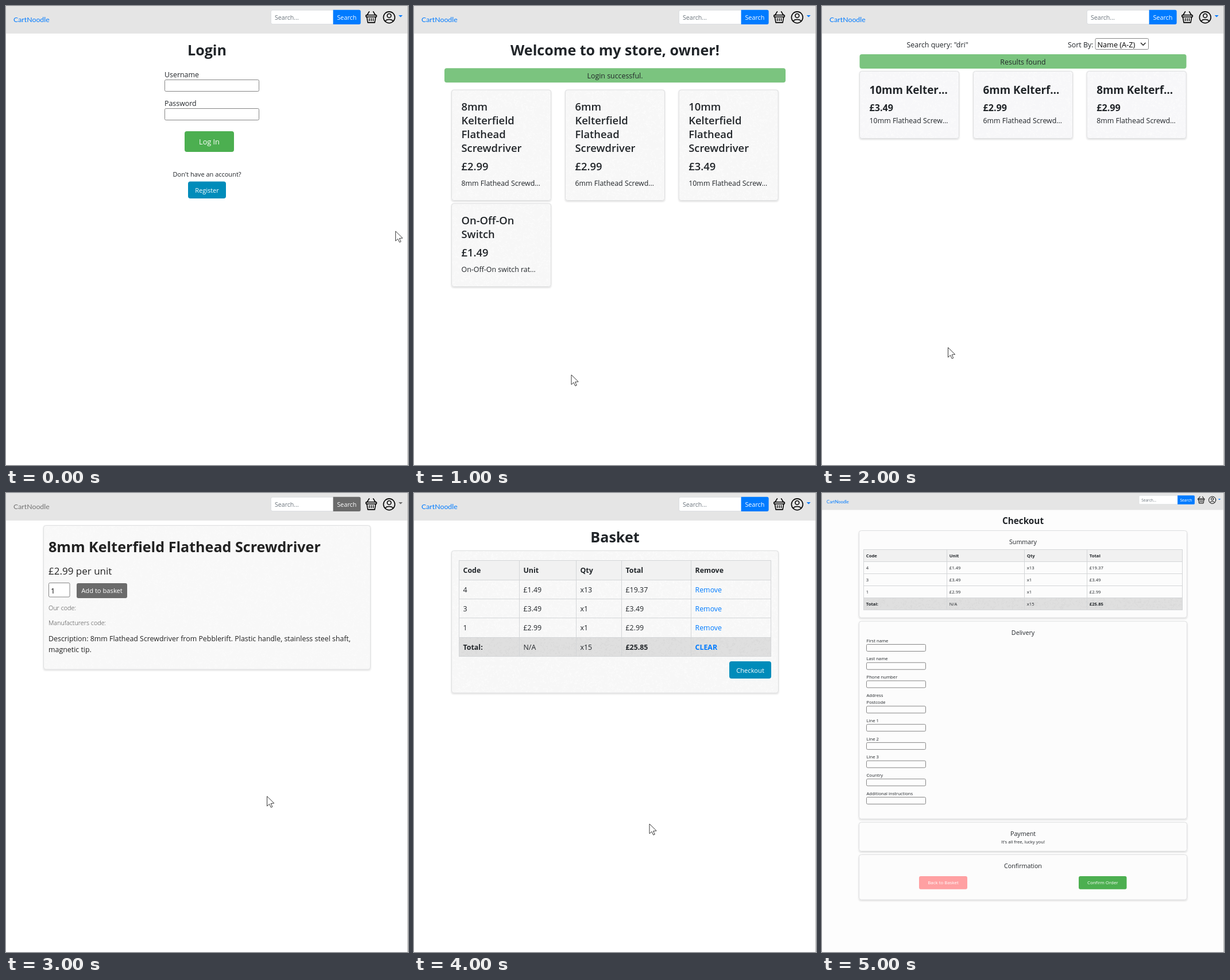
Write an HTML page with a canvas that moves like this. It is 700x799 px and loops after 6000 ms.

```html
<!DOCTYPE html>
<html lang="en">
<head>
<meta charset="utf-8">
<title>Web shop walkthrough</title>
<style>
html, body { margin: 0; width: 100%; height: 100%; overflow: hidden; background: #fff; }
canvas { display: block; width: 700px; height: 799px; }
</style>
</head>
<body>
<canvas id="stage"></canvas>
<script>
const W = 700, H = 799, SCENE_MS = 1000;
const canvas = document.getElementById('stage');
const ctx = canvas.getContext('2d');
const dpr = window.devicePixelRatio || 1;
canvas.width = W * dpr;
canvas.height = H * dpr;

const INK = '#212529', BLUE = '#007bff', GREEN = '#4caf50', TEAL = '#008cba';
const GREY = '#6b6b6b', OK = '#7bc47f', EDGE = '#dedfe0';
const SANS = '"Open Sans", "Noto Sans", sans-serif';
const BODY = 12.4;
const BRAND = 'CartNoodle', USER = 'owner', MAKER = 'Kelterfield', SUPPLIER = 'Pebblerift';

function text(str, x, y, size = BODY, { weight = 400, color = INK, align = 'left', family = SANS } = {}) {
  ctx.font = `${weight} ${size}px ${family}`;
  ctx.fillStyle = color;
  ctx.textAlign = align;
  ctx.fillText(str, x, y);
}

function centered(str, x, y, size, opts = {}) {
  text(str, x, y, size, { ...opts, align: 'center' });
}

function box(x, y, w, h, r, fill, stroke) {
  ctx.beginPath();
  ctx.roundRect(x, y, w, h, r);
  if (fill) {
    ctx.fillStyle = fill;
    ctx.fill();
  }
  if (stroke) {
    ctx.strokeStyle = stroke;
    ctx.lineWidth = 1;
    ctx.stroke();
  }
}

function line(points, color, width = 1) {
  ctx.beginPath();
  points.forEach(([x, y]) => ctx.lineTo(x, y));
  ctx.strokeStyle = color;
  ctx.lineWidth = width;
  ctx.stroke();
}

function random(seed) {
  return () => (seed = (seed * 16807) % 2147483647) / 2147483647;
}

// Fine crackle made of short, randomly turned strokes.
function crackle(x, y, w, h, color) {
  const rnd = random(7 + Math.round(x * 31 + y * 17));
  ctx.save();
  ctx.beginPath();
  ctx.rect(x, y, w, h);
  ctx.clip();
  ctx.beginPath();
  for (let n = w * h / 16; n > 0; n--) {
    const px = x + rnd() * w, py = y + rnd() * h, a = rnd() * 6.283;
    ctx.moveTo(px, py);
    ctx.lineTo(px + 3.5 * Math.cos(a), py + 3.5 * Math.sin(a));
  }
  ctx.strokeStyle = color;
  ctx.lineWidth = 0.7;
  ctx.stroke();
  ctx.restore();
}

function card(x, y, w, h, fill = '#f7f7f7', grain = '#fdfdfd') {
  ctx.save();
  ctx.shadowColor = 'rgba(0,0,0,.14)';
  ctx.shadowBlur = 3 * dpr;
  ctx.shadowOffsetY = 1.5 * dpr;
  box(x, y, w, h, 4, fill);
  ctx.restore();
  if (grain) crackle(x + 1, y + 1, w - 2, h - 2, grain);
  box(x + 0.5, y + 0.5, w - 1, h - 1, 4, null, EDGE);
}

function input(x, y, w, h, fill = '#fff') {
  box(x + 0.5, y + 0.5, w - 1, h - 1, 2, fill, '#858585');
}

function button(label, x, y, w, h, fill, size, baseline) {
  box(x, y, w, h, h > 28 ? 4 : 3, fill);
  centered(label, x + w / 2, baseline, size, { color: '#fff' });
}

function basketIcon() {
  ctx.lineCap = ctx.lineJoin = 'round';
  line([[632.4, 9.8], [628.6, 16]], '#000', 1.6);
  line([[639.6, 9.8], [643.4, 16]], '#000', 1.6);
  ctx.beginPath();
  ctx.roundRect(626.7, 15.8, 18.6, 3.2, 1);
  ctx.stroke();
  line([[628.3, 19], [630, 28.9], [642, 28.9], [643.7, 19]], '#000', 1.6);
  for (const x of [632.6, 636, 639.4]) line([[x, 21.8], [x, 25.8]], '#000', 1.4);
}

function userIcon() {
  ctx.strokeStyle = '#000';
  ctx.lineWidth = 1.6;
  ctx.beginPath();
  ctx.arc(667.2, 19.8, 9.9, 0, 7);
  ctx.stroke();
  ctx.beginPath();
  ctx.arc(667.2, 16.9, 3.4, 0, 7);
  ctx.stroke();
  ctx.beginPath();
  ctx.moveTo(660.4, 26.5);
  ctx.bezierCurveTo(662.4, 22.5, 672, 22.5, 674, 26.5);
  ctx.stroke();
}

function header(accent, scale = 1) {
  ctx.fillStyle = '#e5e5e5';
  ctx.fillRect(0, 0, W, scale === 1 ? 48 : 29.5);

  ctx.save();
  ctx.scale(scale, scale);
  text(BRAND, 13, 28.3, 12.3, { color: accent === GREY ? '#727272' : accent, family: 'Lato, sans-serif' });
  ctx.restore();

  ctx.save();
  ctx.translate(W * (1 - scale), 0);
  ctx.scale(scale, scale);
  box(461.3, 7.2, 109, 24.4, [3, 0, 0, 3], '#fff', '#dadde0');
  text('Search...', 468, 24, 10.6, { color: '#6c757d' });
  box(569.6, 6.7, 48, 25.3, [0, 3, 3, 0], accent);
  centered('Search', 593.4, 23.8, 10.8, { color: '#fff' });
  basketIcon();
  userIcon();
  ctx.beginPath();
  ctx.moveTo(683.6, 16);
  ctx.lineTo(690.6, 16);
  ctx.lineTo(687.1, 19.6);
  ctx.fillStyle = accent;
  ctx.fill();
  ctx.restore();
}

function title(str, y = 86.3, size = 25.1) {
  centered(str, 350, y, size, { weight: 700 });
}

function banner(str, x, y, w) {
  box(x, y, w, 25, 4, OK);
  centered(str, 350, y + 18, BODY);
}

function pointer(x, y) {
  const shape = [[0, 0], [0, 17], [4, 13.4], [6.8, 19.3], [9.3, 18.2], [6.6, 12.5], [12.2, 12]];
  ctx.beginPath();
  shape.forEach(([dx, dy]) => ctx.lineTo(x + dx, y + dy));
  ctx.closePath();
  ctx.fillStyle = '#fff';
  ctx.fill();
  ctx.strokeStyle = '#222';
  ctx.lineWidth = 0.9;
  ctx.lineJoin = 'miter';
  ctx.stroke();
}

// Last row is the shaded total; cols and rows are grid line positions.
function table(cols, rows, data, size, pad, drop, links) {
  const left = cols[0], right = cols.at(-1), top = rows[0], bottom = rows.at(-1);
  const last = data.length - 1, totalY = rows[last];
  ctx.fillStyle = '#f1f1f1';
  ctx.fillRect(left, top, right - left, rows[1] - top);
  ctx.fillStyle = '#dfdfdf';
  ctx.fillRect(left, totalY, right - left, bottom - totalY);
  crackle(left, totalY, right - left, bottom - totalY, '#d7d7d7');
  ctx.lineCap = 'butt';
  for (const x of cols) line([[x + 0.5, top], [x + 0.5, bottom]], '#d4d6d8');
  for (const y of rows) line([[left, y + 0.5], [right + 1, y + 0.5]], '#d4d6d8');
  data.forEach((row, r) => row.forEach((cell, c) => {
    const bold = r === 0 || (r === last && c !== 1 && c !== 2);
    const color = links && c === 4 && r > 0 ? BLUE : INK;
    text(cell, cols[c] + pad, rows[r] + drop, size, { weight: bold ? 700 : 400, color });
  }));
}

const order = [
  ['Code', 'Unit', 'Qty', 'Total', 'Remove'],
  ['4', '£1.49', 'x13', '£19.37', 'Remove'],
  ['3', '£3.49', 'x1', '£3.49', 'Remove'],
  ['1', '£2.99', 'x1', '£2.99', 'Remove'],
  ['Total:', 'N/A', 'x15', '£25.85', 'CLEAR']
];

function login() {
  header(BLUE);
  title('Login');
  text('Username', 276, 123.6);
  input(276, 128, 165, 21);
  text('Password', 276, 174.2);
  input(276, 178, 165, 21);
  button('Log In', 311, 218, 86, 36, GREEN, 12.7, 241);
  centered("Don't have an account?", 350, 296.7, 11);
  button('Register', 317, 305.5, 66, 29.5, TEAL, 11, 324.6);
  pointer(678.4, 392);
}

function store() {
  header(BLUE);
  title(`Welcome to my store, ${USER}!`);
  banner('Login successful.', 53, 108.3, 594);
  const driver = size => [`${size}mm`, MAKER, 'Flathead', 'Screwdriver'];
  const items = [
    [65, 145.5, 193.5, driver(8), '£2.99', '8mm Flathead Screwd…'],
    [263, 145.5, 193.5, driver(6), '£2.99', '6mm Flathead Screwd…'],
    [460.7, 145.5, 193.5, driver(10), '£3.49', '10mm Flathead Screw…'],
    [65, 343.3, 145.7, ['On-Off-On', 'Switch'], '£1.49', 'On-Off-On switch rat…']
  ];
  for (const [x, y, h, name, price, info] of items) {
    card(x, y, 174, h);
    const big = { weight: 600 }, tx = x + 17.5;
    name.forEach((part, i) => text(part, tx, y + 36.6 + i * 23.8, 18.4, big));
    const end = y + 36.6 + (name.length - 1) * 23.8;
    text(price, tx, end + 32, 18.4, big);
    text(info, tx, end + 59.7);
  }
  pointer(274, 642);
}

function results() {
  header(BLUE);
  text('Search query: "dri"', 147.5, 71.7);
  text('Sort By:', 428, 71.7);
  input(475.5, 56, 93.5, 20);
  text('Name (A-Z)', 479.5, 71.7, 12.7, { color: '#000' });
  ctx.lineCap = 'butt';
  line([[555, 64], [559.2, 68.2], [563.4, 64]], '#222', 1.5);
  banner('Results found', 65.5, 84, 569);
  const cut = MAKER.slice(0, 6);
  const items = [
    [65, `10mm ${cut}…`, '£3.49', '10mm Flathead Screw…'],
    [263, `6mm ${cut}${MAKER[6]}…`, '£2.99', '6mm Flathead Screwd…'],
    [460.7, `8mm ${cut}${MAKER[6]}…`, '£2.99', '8mm Flathead Screwd…']
  ];
  for (const [x, name, price, info] of items) {
    card(x, 113, 174, 118, '#f7f7f9', '#fcfcfd');
    text(name, x + 17.5, 152.6, 18.8, { weight: 700 });
    text(price, x + 17.5, 183, 16.2, { weight: 700 });
    text(info, x + 17.5, 204);
  }
  pointer(219.5, 594.5);
}

function product() {
  const ink = { color: '#222' }, faint = { color: '#444', weight: 300 };
  header(GREY);
  card(65, 56, 570, 251.5, '#f8f8f8', '#fbfbfb');
  text(`8mm ${MAKER} Flathead Screwdriver`, 74, 103.3, 25.1, { weight: 700, color: '#222' });
  text('£2.99 per unit', 74, 141.8, 17, ink);
  input(74, 156, 37.5, 25.5);
  text('1', 78, 174.6, 12.7, { color: '#000' });
  button('Add to basket', 123, 157, 88, 26, GREY, 11.2, 174.4);
  text('Our code:', 74, 204.2, 10.8, faint);
  text('Manufacturers code:', 74, 229.6, 10.8, faint);
  text(`Description: 8mm Flathead Screwdriver from ${SUPPLIER}. Plastic handle, stainless steel shaft,`, 74, 257.7, BODY, ink);
  text('magnetic tip.', 74, 277.3, BODY, ink);
  pointer(454.6, 528);
}

function basket() {
  header(BLUE);
  title('Basket');
  card(65, 100, 570, 248.5);
  table([78, 183, 282, 361, 482, 621], [117, 151, 184, 217, 251, 284], order, BODY, 7.5, 22.2, true);
  button('Checkout', 549, 293, 73, 30, TEAL, 11.2, 312.5);
  pointer(410, 576);
}

function checkout() {
  ctx.fillStyle = '#fdfdfd';
  ctx.fillRect(0, 0, W, H);
  header(BLUE, 0.62);
  title('Checkout', 53.8, 15.3);

  const panels = [
    ['Summary', 65, 152.5, 88.7],
    ['Delivery', 222.7, 345, 246.5],
    ['Payment', 572.7, 51.3, 596.5],
    ['Confirmation', 629, 79.5, 652.7]
  ];
  for (const [name, y, h, baseline] of panels) {
    card(64, y, 572, h, '#fcfcfc', null);
    centered(name, 350, baseline, 10.7);
  }

  const rows = [98, 119, 140, 161, 182, 203];
  table([72, 217, 352, 461, 627], rows, order.map(r => r.slice(0, 4)), 7.7, 4.8, 14.2, false);

  const field = (label, y) => {
    text(label, 77.5, y - 3.3, 7.7);
    input(77, y, 104, 13, '#fdfdfd');
  };
  ['First name', 'Last name', 'Phone number'].forEach((s, i) => field(s, 263 + i * 31.7));
  text('Address', 77.5, 355, 7.7);
  ['Postcode', 'Line 1', 'Line 2', 'Line 3', 'Country', 'Additional instructions']
    .forEach((s, i) => field(s, 370.5 + i * 31.7));

  centered("It's all free, lucky you!", 350, 609.6, 7.7);
  button('Back to Basket', 169, 667, 84, 22.7, '#ffa0a2', 7.9, 681.4);
  button('Confirm Order', 447, 667, 83.5, 22.7, GREEN, 7.9, 681.4);
}

const scenes = [login, store, results, product, basket, checkout];
const start = performance.now();
let shown = -1;

function draw(index) {
  ctx.setTransform(dpr, 0, 0, dpr, 0, 0);
  ctx.fillStyle = '#fff';
  ctx.fillRect(0, 0, W, H);
  scenes[index]();
  ctx.fillStyle = '#b4b4b4';
  ctx.fillRect(699, 0, 1, H);
}

function tick() {
  const elapsed = Math.max(0, performance.now() - start);
  const index = Math.floor(elapsed / SCENE_MS) % scenes.length;
  if (index !== shown) draw(shown = index);
  requestAnimationFrame(tick);
}
tick();
</script>
</body>
</html>
```
